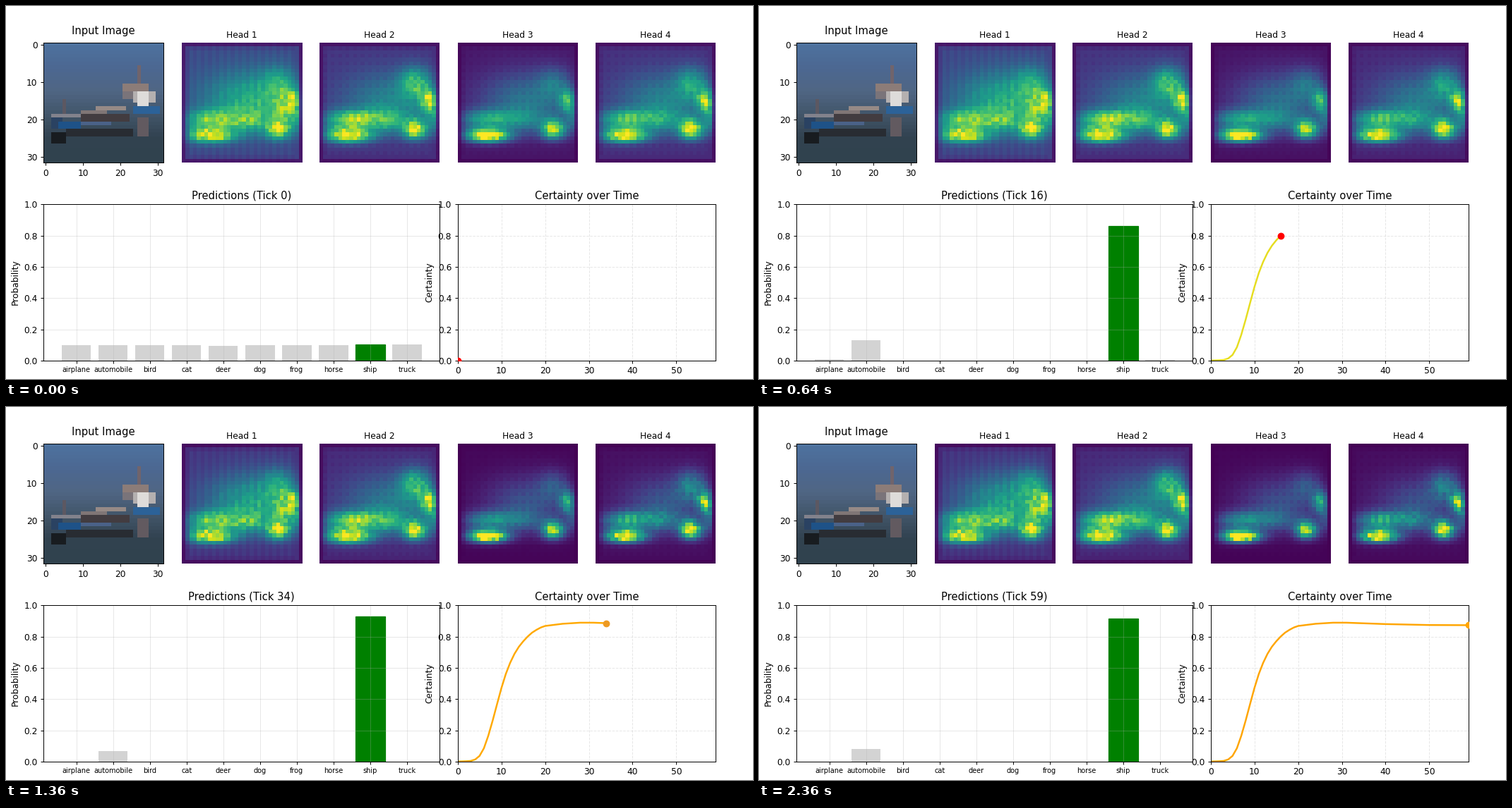
A matplotlib script that plays this animation: 1058x529 px, repeating every 2400 ms.

```python
import numpy as np
import matplotlib.pyplot as plt
from matplotlib.animation import FuncAnimation
from matplotlib.colors import LinearSegmentedColormap, to_rgb

W, H = 1058, 529
TICKS = 60
N = 32
CLASSES = ["airplane", "automobile", "bird", "cat", "deer",
           "dog", "frog", "horse", "ship", "truck"]
TRUE = CLASSES.index("ship")

# Certainty: every tick while it rises, then a few points on the plateau
RISE = [0, 0.001, 0.002, 0.004, 0.013, 0.036, 0.085, 0.165, 0.262, 0.367, 0.47,
        0.56, 0.632, 0.69, 0.735, 0.77, 0.80, 0.825, 0.843, 0.858, 0.868]
tick_axis = np.arange(TICKS)
certainty = np.interp(tick_axis, [*range(21), 24, 28, 31, 40, 50, 59],
                      RISE + [0.882, 0.889, 0.889, 0.880, 0.874, 0.873])


def stage(rest, **known):
    return [known.get(name, rest) for name in CLASSES]


# Class probabilities at four moments of the rise
STAGES = np.array([
    stage(0.1, deer=0.095, ship=0.104, truck=0.103),
    stage(0.017, airplane=0.073, automobile=0.272, bird=0.03,
          dog=0.012, horse=0.008, ship=0.5, truck=0.065),
    stage(5e-4, airplane=0.006, automobile=0.128, ship=0.86, truck=0.003),
    stage(1e-4, automobile=0.072, ship=0.928),
])
STAGE_KEYS = np.sqrt(certainty[[0, 9, 16, 24]])


def probabilities(t):
    key = np.sqrt(certainty[min(t, 24)])
    p = np.exp([np.interp(key, STAGE_KEYS, col) for col in np.log(STAGES).T])
    p /= p.sum()
    if t > 24:
        p[1] = np.interp(t, [24, 34, 50, 59], [0.072, 0.068, 0.080, 0.081])
        p[TRUE] = 0.998 - p[1]
    return p


def boat_picture():
    """Soft sky-to-water gradient with a few flat blocks for the boat."""
    shades = LinearSegmentedColormap.from_list(
        "sea", ["#4e729e", "#4c6892", "#506684", "#42566a", "#324250", "#30424e"])
    img = np.repeat(shades(np.linspace(0, 1, N))[:, None, :3], N, axis=1)
    blocks = [
        (5, 15, 6, 19, "#5c5862"), (25, 6, 26, 12, "#70646c"),
        (21, 11, 28, 13, "#8c7c78"), (21, 13, 24, 15, "#7a747a"),
        (2, 19, 11, 20, "#82828c"), (10, 18, 17, 19, "#807676"),
        (14, 17, 22, 18, "#968a86"), (10, 19, 23, 21, "#423c40"),
        (2, 20, 5, 23, "#2a4262"), (4, 21, 10, 23, "#1e5288"),
        (10, 21, 18, 22, "#4a6288"), (24, 17, 31, 19, "#2c6298"),
        (6, 23, 24, 25, "#282c32"), (2, 24, 6, 27, "#181c20"),
        (24, 13, 30, 16, "#b4b0b0"), (25, 13, 28, 17, "#dedcda"),
        (25, 20, 28, 25, "#625a60"),
    ]
    for x0, y0, x1, y1, color in blocks:
        img[y0:y1, x0:x1] = to_rgb(color)
    return img


# Attention blobs shared by all heads: centre x, y and spread x, y
BLOBS = [
    (18, 15, 9, 5.5), (8, 19.5, 5, 1.6), (7.5, 24.3, 3.6, 1.2), (17, 20, 4, 2.2),
    (25, 22.5, 2.3, 1.9), (28.7, 15, 1.5, 2.2), (25, 10.5, 3, 3),
    (30, 19, 0.9, 3), (10, 19.7, 2, 1), (7, 23, 4.5, 2.6), (26, 17.5, 2.4, 3.2),
]
# Percent strength of each blob, one row per head
STRENGTH = ["46 50 75 42 78 72 38 35 10 52 50",
            "30 45 80 50 86 86 55 40 62 55 5",
            "27 36 86 20 68 48 20 26 0 26 0",
            "30 45 86 32 88 72 38 40 0 38 0"]
BACKGROUND = [0.21, 0.14, 0.05, 0.12]
SHARPNESS = [1.28, 1.16, 1.55, 1.75]

gy, gx = np.mgrid[0:N, 0:N]
keel = 1 / (1 + np.exp((gy - 27) / 0.6))
border = np.minimum.reduce([gx, gy, N - 1 - gx, N - 1 - gy])
edge = np.interp(border, [0, 1, 2], [0.3, 0.85, 1])


def head_map(i):
    rest = np.full((N, N), 1 - BACKGROUND[i])
    for (x, y, sx, sy), a in zip(BLOBS, STRENGTH[i].split()):
        g = np.exp(-((gx - x) / sx) ** 2 / 2 - ((gy - y) / sy) ** 2 / 2)
        rest = rest * (1 - int(a) / 100 * g * keel)
    v = 1 - rest
    weave = gx % 2 if i == 0 else (gx % 2) * (gy % 2)
    v = v * (1 - 0.15 * weave * (1 - v))
    noise = np.random.default_rng(i + 3).uniform(-1, 1, (N, N))
    v = v * (1 + 0.13 * noise * np.clip(v * 2 - 0.5, 0.1, 1)) * edge
    return np.clip(v / np.sort(v.ravel())[-6], 0, 1)


maps = [head_map(i) for i in range(4)]


def sharpened(i, t):
    k = np.interp(t, [10, 16, 24, 34, 50, 59], [0, 0.15, 0.4, 0.85, 0.97, 1])
    return maps[i] ** (1 + (SHARPNESS[i] - 1) * k)


def line_color(t):
    return "#e6dd20" if t < 20 else "#ffb01c" if t < 29 else "#ffa900" if t < 40 else "orange"


def dot_color(t):
    return "red" if t < 29 else "#ee9a22" if t < 40 else "orange"


fig = plt.figure(figsize=(12, 6), dpi=H / 6, facecolor="white")


def axes_at(x, y, w, h):
    return fig.add_axes([x / W, 1 - (y + h) / H, w / W, h / H])


LEFT, STEP, SIZE = 53.2, 195.5, 170

ax_img = axes_at(LEFT, 52, SIZE, SIZE)
ax_img.imshow(boat_picture(), interpolation="nearest", aspect="auto")
ax_img.set_title("Input Image", pad=10)
ax_img.set_xticks(range(0, N, 10))
ax_img.set_yticks(range(0, N, 10))

heat = []
for i in range(4):
    ax = axes_at(LEFT + STEP * (i + 1), 52, SIZE, SIZE)
    heat.append(ax.imshow(maps[i], cmap="viridis", vmin=0, vmax=1,
                          interpolation="nearest", aspect="auto"))
    ax.set_title(f"Head {i + 1}", fontsize=10)
    ax.axis("off")

ax_bar = axes_at(LEFT, 281.3, 2 * STEP + SIZE, 221.5)
bars = ax_bar.bar(range(10), STAGES[0], color="lightgray")
bars[TRUE].set_color("green")
ax_bar.set_xlim(-0.89, 9.89)
ax_bar.set_ylim(0, 1)
ax_bar.set_xticks(range(10), CLASSES, fontsize=8)
ax_bar.set_ylabel("Probability")
ax_bar.grid(True, alpha=0.3)
bar_title = ax_bar.set_title("Predictions (Tick 0)")

ax_cert = axes_at(LEFT + 3 * STEP, 281.3, STEP + SIZE, 221.5)
curve, = ax_cert.plot([], [], lw=2)
dot, = ax_cert.plot([], [], "o", ms=7, zorder=5)
ax_cert.set_xlim(0, TICKS - 1)
ax_cert.set_ylim(0, 1)
ax_cert.set_title("Certainty over Time")
ax_cert.set_xlabel("Tick")
ax_cert.set_ylabel("Certainty")
ax_cert.grid(True, linestyle="--", alpha=0.3)


def update(t):
    for i, im in enumerate(heat):
        im.set_data(sharpened(i, t))
    for bar, p in zip(bars, probabilities(t)):
        bar.set_height(p)
    bar_title.set_text(f"Predictions (Tick {t})")
    curve.set_data(tick_axis[:t + 1], certainty[:t + 1])
    curve.set_color(line_color(t))
    dot.set_data([t], [certainty[t]])
    dot.set_color(dot_color(t))
    return [*heat, *bars, bar_title, curve, dot]


anim = FuncAnimation(fig, update, frames=TICKS, interval=40, repeat=True, repeat_delay=0)
plt.show()
```
